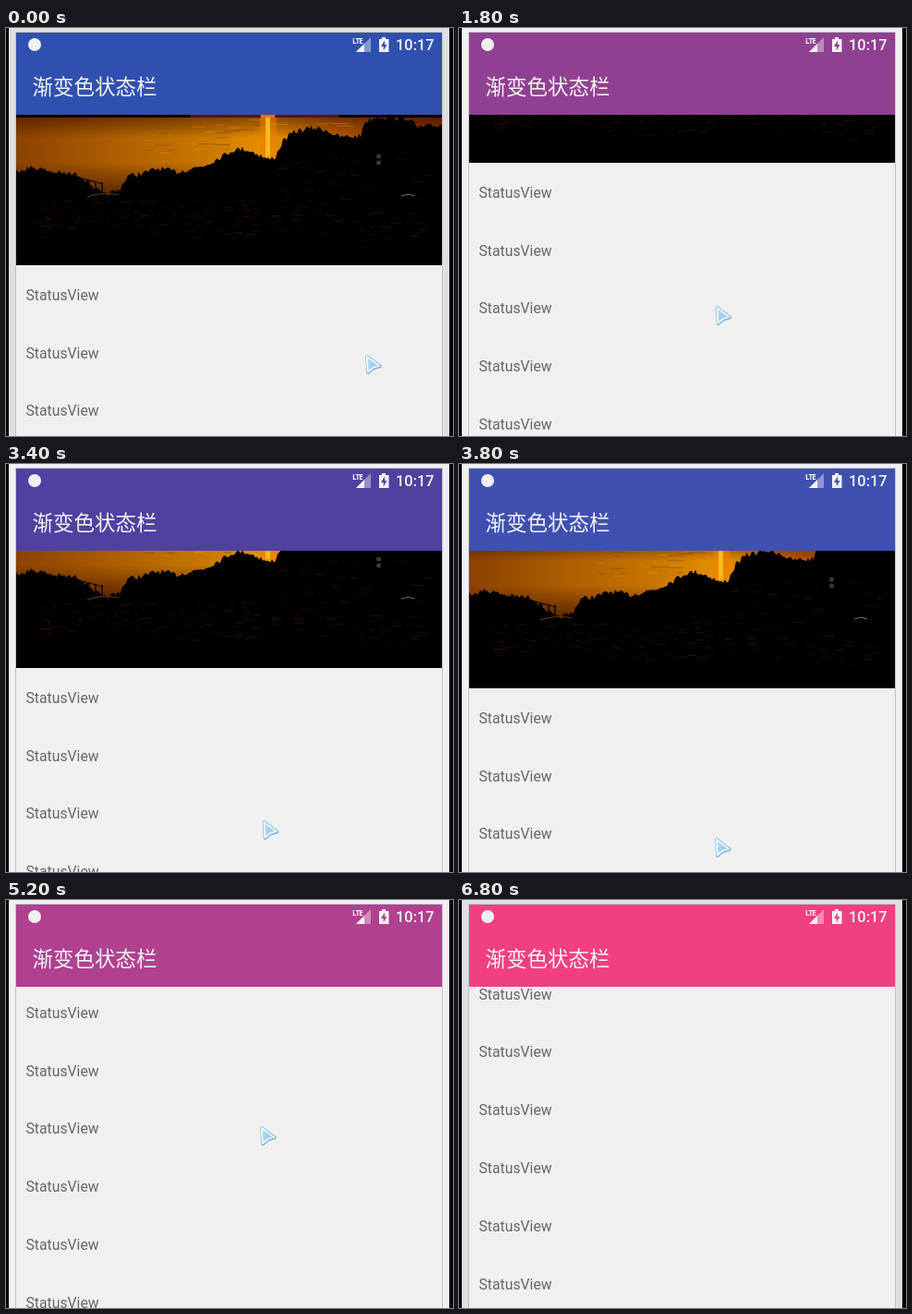
Recreate the animation shown at these times as an HTML page. Size 484 by 442 pixels, loop 7.6 s.

```html
<!DOCTYPE html>
<html lang="zh">
<head>
<meta charset="utf-8">
<title>渐变色状态栏</title>
<style>
  html, body { margin: 0; width: 100%; height: 100%; overflow: hidden; background: #000; }
  svg { display: block; width: 484px; height: 442px; }
  .row { font: 15.75px Roboto, sans-serif; fill: #666; }
  .title { font: 22.5px "Noto Sans CJK SC", "Noto Sans CJK", sans-serif; fill: #f4f4f4; }
  .clock { font: 500 16.4px Roboto, sans-serif; fill: #f4f4f4; }
  .net { font: 700 8px "Open Sans", Roboto, sans-serif; letter-spacing: -.9px; fill: #f4f4f4; }
</style>
</head>
<body>
<svg viewBox="0 0 484 442">
  <defs>
    <linearGradient id="water" x1="0" x2="1" y1="0" y2="0">
      <stop offset="0" stop-color="#8a4200"/>
      <stop offset=".25" stop-color="#b06000"/>
      <stop offset=".45" stop-color="#c87800"/>
      <stop offset=".59" stop-color="#e89000"/>
      <stop offset=".75" stop-color="#b85c00"/>
      <stop offset="1" stop-color="#803000"/>
    </linearGradient>
    <linearGradient id="dusk" x1="0" x2="0" y1="0" y2="1">
      <stop offset="0" stop-color="#300800" stop-opacity=".5"/>
      <stop offset=".25" stop-color="#300800" stop-opacity="0"/>
      <stop offset=".55" stop-color="#300800" stop-opacity="0"/>
      <stop offset="1" stop-color="#300800" stop-opacity=".75"/>
    </linearGradient>
    <linearGradient id="ice" x1="0" x2="1" y1="0" y2="1">
      <stop offset="0" stop-color="#b8e0f8"/>
      <stop offset="1" stop-color="#88c0ec"/>
    </linearGradient>
    <clipPath id="screen"><rect x="11" y="5" width="461" height="437"/></clipPath>
  </defs>

  <rect id="side" x="3" width="477" height="442"/>
  <rect x="10" y="4" width="463" height="440" fill="#c4c0c0"/>
  <rect x="11" y="5" width="461" height="437" fill="#f0f0f0"/>

  <g clip-path="url(#screen)">
    <g id="list">
      <rect x="11" y="5" width="461" height="252" fill="#000"/>
      <rect x="11" y="97" width="461" height="88" fill="url(#water)"/>
      <rect x="11" y="97" width="461" height="88" fill="url(#dusk)"/>
      <g id="glints"></g>
      <path id="land"/>
      <g id="grass"></g>
      <path d="M18 157 L75 161 L105 169 M18 163 L75 168 L105 178" fill="none" stroke="#000" stroke-width="1"/>
      <path id="fence" fill="none" stroke="#000" stroke-width="1.2"/>
      <path d="M88 183 Q106 177 123 181" fill="none" stroke="#583000" stroke-width="1.2"/>
      <path d="M428 182 L436 180 L442 182" fill="none" stroke="#706860" stroke-width="1.2"/>
      <circle cx="403.500" cy="139" r="2.500" fill="#403830"/>
      <circle cx="403.500" cy="146" r="2.500" fill="#403830"/>
    </g>
  </g>

  <rect id="bar" x="11" y="5" width="461" height="89"/>
  <circle cx="31" cy="18" r="7" fill="#f0f0f0"/>
  <text class="net" x="375" y="16.500">LTE</text>
  <path d="M379 26 L395 10 V26 Z" fill="#fff" opacity=".4"/>
  <path d="M379 26 L388 17 V26 Z" fill="#f4f4f4"/>
  <path d="M404 12 H407 V10 H411 V12 H414.500 V26 H404 Z" fill="#f4f4f4"/>
  <path id="bolt" d="M410 13.500 L406 20 H408.700 V24.500 L412.500 18 H410 Z"/>
  <text class="clock" x="422" y="24.300">10:17</text>
  <text class="title" x="28.500" y="71.500">渐变色状态栏</text>

  <g id="cursor" stroke-linejoin="round">
    <path d="M2 2 L16 12.500 L9 14.500 L3 19.500 Z" fill="none" stroke="#80b0e0" stroke-width="3.500"/>
    <path d="M1.800 1.800 L15.300 12 L8.600 14 L2.800 18.800 Z" fill="url(#ice)" stroke="#f4faff" stroke-width="1.800"/>
  </g>
</svg>
<script>
const LOOP = 7600, STEP = 200, DRAG = 800, RANGE = 252;
// Scroll offset at each step of the drag
const scroll = [4, 18, 37, 61, 87, 111, 128, 136, 129, 111, 91, 73, 54, 36, 20,
  14, 43, 76, 103, 121, 137, 152, 167, 184, 202, 217, 229, 239, 246, 250];

const $ = id => document.getElementById(id);
const clamp = (v, lo, hi) => Math.min(hi, Math.max(lo, v));

function add(parent, tag, attrs, text) {
  const el = document.createElementNS("http://www.w3.org/2000/svg", tag);
  for (const k in attrs) el.setAttribute(k, attrs[k]);
  if (text) el.textContent = text;
  parent.append(el);
}

let seed = 7;
const rand = () => (seed = seed * 16807 % 2147483647) / 2147483647;

function drawLand() {
  const ridge = [[11, 154], [30, 151], [55, 157], [80, 159], [90, 168], [105, 181],
    [122, 176], [132, 160], [150, 157], [165, 152], [185, 156], [215, 149], [232, 140],
    [246, 132], [258, 131], [272, 136], [284, 143], [292, 139], [300, 122], [313, 112],
    [332, 108], [346, 110], [360, 118], [384, 117], [388, 102], [402, 96], [436, 98],
    [446, 108], [472, 105]];
  let d = "M11 257";
  for (let i = 1; i < ridge.length; i++) {
    const [x0, y0] = ridge[i - 1], [x1, y1] = ridge[i];
    for (let x = x0; x < x1; x += 2) {
      const y = y0 + (y1 - y0) * (x - x0) / (x1 - x0);
      d += `L${x} ${(y + rand() * 6 - 3).toFixed(1)}`;
    }
  }
  $("land").setAttribute("d", d + "L472 105V257Z");
}

function drawPhoto() {
  for (let i = 0; i < 55; i++) {
    add($("glints"), "rect", { x: 150 + rand() * 230, y: 99 + rand() * 36,
      width: 5 + rand() * 16, height: 1, fill: i % 2 ? "#e09000" : "#804000", opacity: .5 });
  }
  add($("glints"), "rect", { x: 275, y: 97, width: 18, height: 42, fill: "#f08000", opacity: .5 });
  add($("glints"), "rect", { x: 281, y: 94, width: 5, height: 45, fill: "#ffb820" });
  add($("glints"), "rect", { x: 200, y: 94, width: 160, height: 3, fill: "#601000" });
  add($("glints"), "rect", { x: 276, y: 94, width: 15, height: 3, fill: "#ff7000" });
  drawLand();
  for (let i = 0; i < 190; i++) {
    const x = 20 + rand() * 435;
    add($("grass"), "rect", { x, y: (x < 290 ? 186 : 140) + rand() * (x < 290 ? 42 : 92),
      width: 2 + rand() * 10, height: 1, fill: i % 3 ? "#140500" : "#241000" });
  }
  let posts = "";
  for (let x = 20; x < 106; x += 7) posts += `M${x} ${155 + (x - 20) * .14}v13`;
  $("fence").setAttribute("d", posts);
}

function barColor(p) {
  const from = [63, 81, 181], to = [255, 64, 129];
  return `rgb(${from.map((c, i) => Math.floor(c + (to[i] - c) * p) & 240)})`;
}

function cursorAt(t, n, s) {
  if (t < 200) return [389, 354];
  if (t < 400) return [334, 390];
  if (t < DRAG) return [279, 422];
  const lag = clamp((s - (scroll[n - 1] || 0)) / 3, -5, 5);
  const x = 277.5 - 4.5 * clamp((t - 3400) / 3200, 0, 1);
  return [x, t < 6600 ? 417 - s - lag : 167];
}

function render(now) {
  const t = Math.floor(now % LOOP / STEP) * STEP;
  const n = Math.min((t - DRAG) / STEP, scroll.length - 1);
  const s = n < 0 ? 0 : scroll[n];
  const color = barColor(Math.min(s / RANGE, 1));
  $("list").setAttribute("transform", `translate(0 ${-s})`);
  $("bar").setAttribute("fill", color);
  $("bolt").setAttribute("fill", color);
  $("side").setAttribute("fill", t >= DRAG && t < 6800 ? "#f0f0f0" : "#e0e0e0");
  $("cursor").setAttribute("transform", `translate(${cursorAt(t, n, s)})`);
  $("cursor").setAttribute("visibility", t < 6800 ? "visible" : "hidden");
}

drawPhoto();
for (let k = 0; k < 8; k++) {
  add($("list"), "text", { class: "row", x: 21.5, y: 294.8 + k * 62.8 }, "StatusView");
}

const start = performance.now();
function tick() {
  render(performance.now() - start);
  requestAnimationFrame(tick);
}
tick();
</script>
</body>
</html>
```
